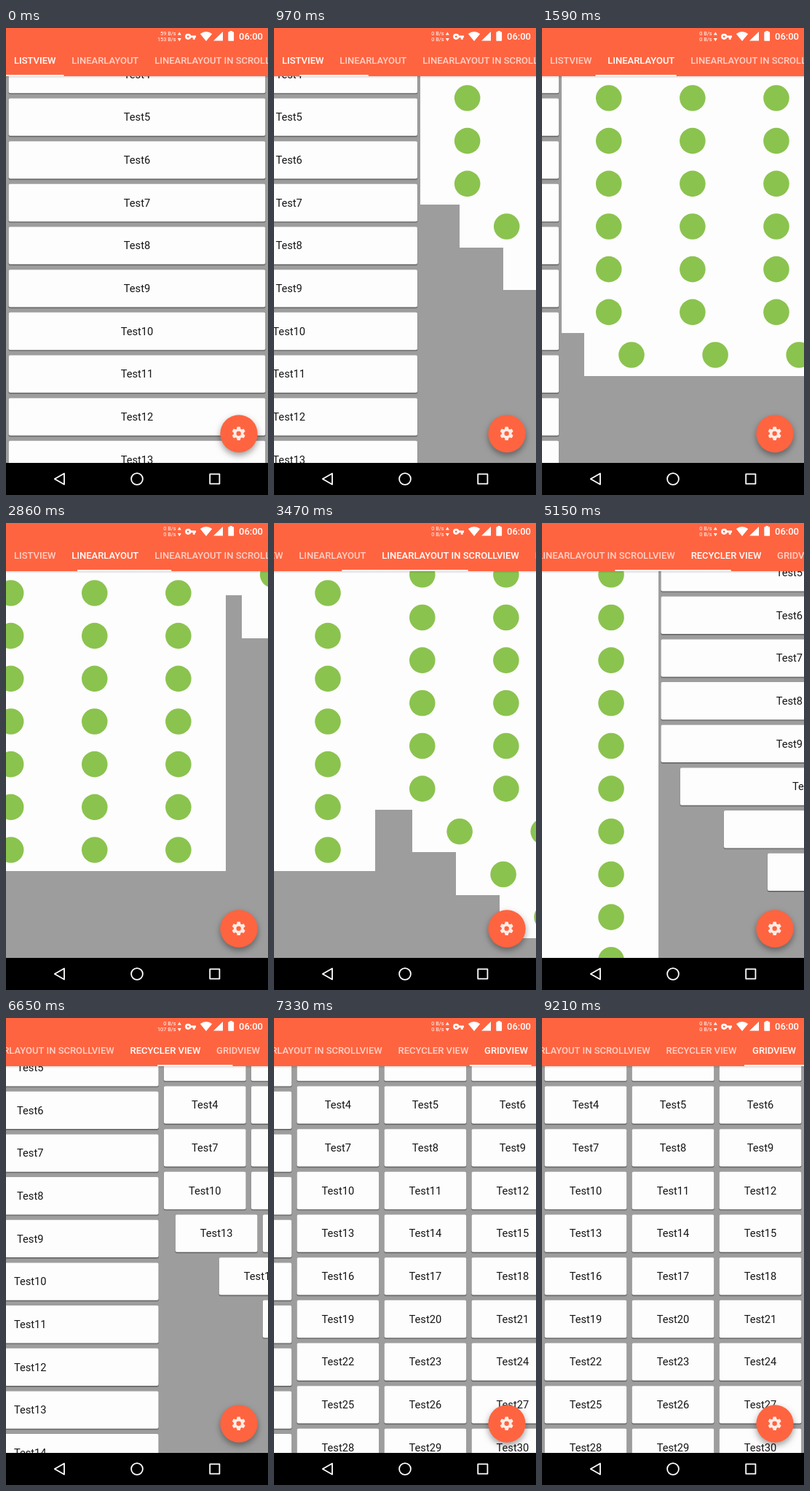
These frames come from a looping animation (360 px wide and 640 px high, 9.44 s). An HTML page with a canvas:

```html
<!DOCTYPE html>
<html lang="en">
<head>
<meta charset="utf-8">
<title>Staggered pager</title>
<style>
html, body { margin: 0; width: 100%; height: 100%; overflow: hidden; background: #000; }
canvas { display: block; width: 360px; height: 640px; }
</style>
</head>
<body>
<canvas id="stage"></canvas>
<script>
const W = 360, H = 640, LOOP = 9440;
const DP = 11 / 12;
const TOP = 66, BOTTOM = 596, ROW = 64 * DP;
const ORANGE = '#ff6440', GRAY = '#9d9d9d', PAPER = '#fdfdfd', GREEN = '#8bc34f', WHITE = '#fff';
const FONT = 'Roboto, sans-serif';

const canvas = document.getElementById('stage');
const ctx = canvas.getContext('2d');
const dpr = window.devicePixelRatio || 1;
canvas.width = W * dpr;
canvas.height = H * dpr;

const clamp = (v, lo, hi) => Math.min(hi, Math.max(lo, v));
const mix = (a, b, k) => a + (b - a) * k;

// Each swipe: start, duration, finger speed in px per ms
const swipes = [
  [410, 1680, 0.2805],
  [2650, 1440, 0.267],
  [4470, 1480, 0.291],
  [6120, 1330, 0.2726]
];

// Steady drag, then a quintic settle that keeps the speed continuous
function swipeOffset(t, [start, duration, speed]) {
  const slop = 2, u = t - start;
  if (u < 0) return 0;
  if (u >= duration) return W;
  const release = (5 * (W - slop) - speed * duration) / (4 * speed);
  if (u < release) return slop + speed * u;
  const from = slop + speed * release;
  const k = (u - release) / (duration - release);
  return mix(from, W, 1 - (1 - k) ** 5);
}

const pagerPosition = t => swipes.reduce((sum, s) => sum + swipeOffset(t, s) / W, 0);

function fillRect(x, y, w, h, color) {
  ctx.fillStyle = color;
  ctx.fillRect(x, y, w, h);
}

function roundRect(x, y, w, h, r, color) {
  ctx.fillStyle = color;
  ctx.beginPath();
  ctx.roundRect(x, y, w, h, r);
  ctx.fill();
}

function disc(x, y, r, color) {
  ctx.fillStyle = color;
  ctx.beginPath();
  ctx.arc(x, y, r, 0, 7);
  ctx.fill();
}

function polygon(...pts) {
  ctx.beginPath();
  pts.forEach(([x, y]) => ctx.lineTo(x, y));
  ctx.closePath();
}

function text(str, x, y, size, color, align = 'left', weight = 400) {
  ctx.font = `${weight} ${size}px ${FONT}`;
  ctx.textAlign = align;
  ctx.fillStyle = color;
  ctx.fillText(str, x, y);
}

function card(x, y, w, label) {
  const m = 4 * DP, cw = w - 2 * m, ch = ROW - 2 * m;
  roundRect(x + m - 0.5, y + m + 0.3, cw + 1, ch + 1.6, 2.4, 'rgba(0,0,0,.16)');
  roundRect(x + m, y + m + 0.5, cw, ch + 0.6, 2, 'rgba(0,0,0,.25)');
  roundRect(x + m, y + m, cw, ch, 2, PAPER);
  text(label, x + w / 2, y + ROW / 2 + 5.2, 16 * DP, '#161616', 'center');
}

function cardRow(columns, first) {
  return (x, y, i) => {
    const w = W / columns;
    for (let c = 0; c < columns; c++) card(x + c * w, y, w, 'Test' + (first + i * columns + c));
  };
}

// Whole-pixel edges keep neighbouring rows free of seams
function iconRow(x, y) {
  const left = Math.round(x), top = Math.round(y);
  fillRect(left, top, W, Math.round(y + ROW) - top, PAPER);
  for (let c = 0; c < 3; c++) disc(x + 65 + c * 115.1, y + 30, 17.8, GREEN);
}

// top: y of the first visible row; reach: total stagger distance in px
const pages = [
  { rows: 10, top: 34.2, reach: 600, draw: cardRow(1, 4) },
  { rows: 7, top: TOP, reach: 420, draw: iconRow },
  { rows: 10, top: 40.8, reach: 600, draw: iconRow },
  { rows: 10, top: 38.4, reach: 600, draw: cardRow(1, 5) },
  { rows: 10, top: 31.2, reach: 697, draw: cardRow(3, 1) }
];

function drawPage(index, left) {
  const page = pages[index];
  const entered = 1 - Math.max(0, left) / W;
  for (let i = 0; i < page.rows; i++) {
    const lag = Math.max(0, 60 * (i + 1) - page.reach * entered);
    if (left + lag < W) page.draw(left + lag, page.top + i * ROW, i);
  }
}

function drawPager(pos) {
  ctx.save();
  ctx.beginPath();
  ctx.rect(0, TOP, W, BOTTOM - TOP);
  ctx.clip();
  fillRect(0, TOP, W, BOTTOM - TOP, GRAY);
  const index = Math.floor(pos), left = (index - pos) * W;
  drawPage(index, left);
  if (left < 0) drawPage(index + 1, left + W);
  ctx.restore();
}

const tabs = ['LISTVIEW', 'LINEARLAYOUT', 'LINEARLAYOUT IN SCROLLVIEW', 'RECYCLER VIEW', 'GRIDVIEW'];
const edges = [0, 79.5, 193, 404, 522, 604];

function drawTabs(pos) {
  const i = Math.floor(pos), k = pos - i, next = Math.min(i + 1, tabs.length - 1);
  const center = n => (edges[n] + edges[n + 1]) / 2;
  const scroll = clamp(mix(center(i), center(next), k) - W / 2, 0, edges[5] - W);
  const selected = Math.round(pos);
  fillRect(0, 0, W, TOP, ORANGE);
  tabs.forEach((name, n) => {
    const color = n === selected ? WHITE : 'rgba(255,255,255,.7)';
    text(name, center(n) - scroll, 49, 13, color, 'center', 500);
  });
  const x0 = mix(edges[i], edges[next], k), x1 = mix(edges[i + 1], edges[next + 1], k);
  fillRect(x0 - scroll, 64.2, x1 - x0, 1.8, WHITE);
  const shade = ctx.createLinearGradient(0, TOP, 0, TOP + 3);
  shade.addColorStop(0, 'rgba(0,0,0,.14)');
  shade.addColorStop(1, 'rgba(0,0,0,0)');
  fillRect(0, TOP, W, 3, shade);
}

function networkSpeed(t) {
  if (t < 60) return [59, 153];
  return t >= 6150 && t < 7150 ? [0, 107] : [0, 0];
}

function drawStatus(t) {
  const [up, down] = networkSpeed(t);
  text(up + ' B/s', 233.5, 10, 8 * DP, WHITE, 'right');
  text(down + ' B/s', 233.5, 18.3, 8 * DP, WHITE, 'right');
  polygon([235.8, 9.6], [238.3, 5.4], [240.8, 9.6]);
  ctx.fill();
  polygon([235.8, 14], [238.3, 18.2], [240.8, 14]);
  ctx.fill();

  disc(250.2, 11.8, 4.1, WHITE);
  fillRect(253, 10.4, 8, 2.8, WHITE);
  fillRect(256.8, 11, 2.8, 4.8, WHITE);
  disc(250.2, 11.8, 1.4, ORANGE);

  ctx.fillStyle = WHITE;
  ctx.beginPath();
  ctx.moveTo(275, 18);
  ctx.lineTo(266.8, 8);
  ctx.quadraticCurveTo(275, 2.2, 283.2, 8);
  ctx.fill();
  polygon([298, 5], [298, 17.6], [285, 17.6]);
  ctx.fill();
  roundRect(305.3, 5.2, 7.8, 12.6, 0.8, WHITE);
  fillRect(307.4, 4, 3.6, 2, WHITE);
  text('06:00', 320, 16.2, 14.2 * DP, WHITE, 'left', 500);
}

function drawNavigation() {
  fillRect(0, BOTTOM, W, H - BOTTOM, '#000');
  ctx.strokeStyle = WHITE;
  ctx.lineWidth = 1.8;
  ctx.lineJoin = 'round';
  polygon([66.8, 618], [80, 610.5], [80, 625.5]);
  ctx.stroke();
  ctx.beginPath();
  ctx.arc(180, 618, 7.9, 0, 7);
  ctx.stroke();
  ctx.strokeRect(280.2, 611.4, 13.2, 13.2);
}

function drawButton() {
  const x = 320, y = 556, gear = '#ffece6';
  ctx.save();
  ctx.shadowColor = 'rgba(0,0,0,.38)';
  ctx.shadowBlur = 8 * dpr;
  ctx.shadowOffsetY = 4 * dpr;
  disc(x, y, 28 * DP, ORANGE);
  ctx.restore();

  ctx.save();
  ctx.translate(x - 0.3, y - 0.3);
  disc(0, 0, 6.8, gear);
  for (let i = 0; i < 6; i++) {
    polygon([-2.9, -5.5], [-2, -9.2], [2, -9.2], [2.9, -5.5]);
    ctx.fill();
    ctx.rotate(Math.PI / 3);
  }
  disc(0, 0, 3.2, ORANGE);
  ctx.restore();
}

const start = performance.now();

function frame() {
  const t = (performance.now() - start) % LOOP;
  const pos = pagerPosition(t);
  ctx.setTransform(dpr, 0, 0, dpr, 0, 0);
  drawPager(pos);
  drawTabs(pos);
  drawStatus(t);
  drawNavigation();
  drawButton();
  requestAnimationFrame(frame);
}
frame();
</script>
</body>
</html>
```
